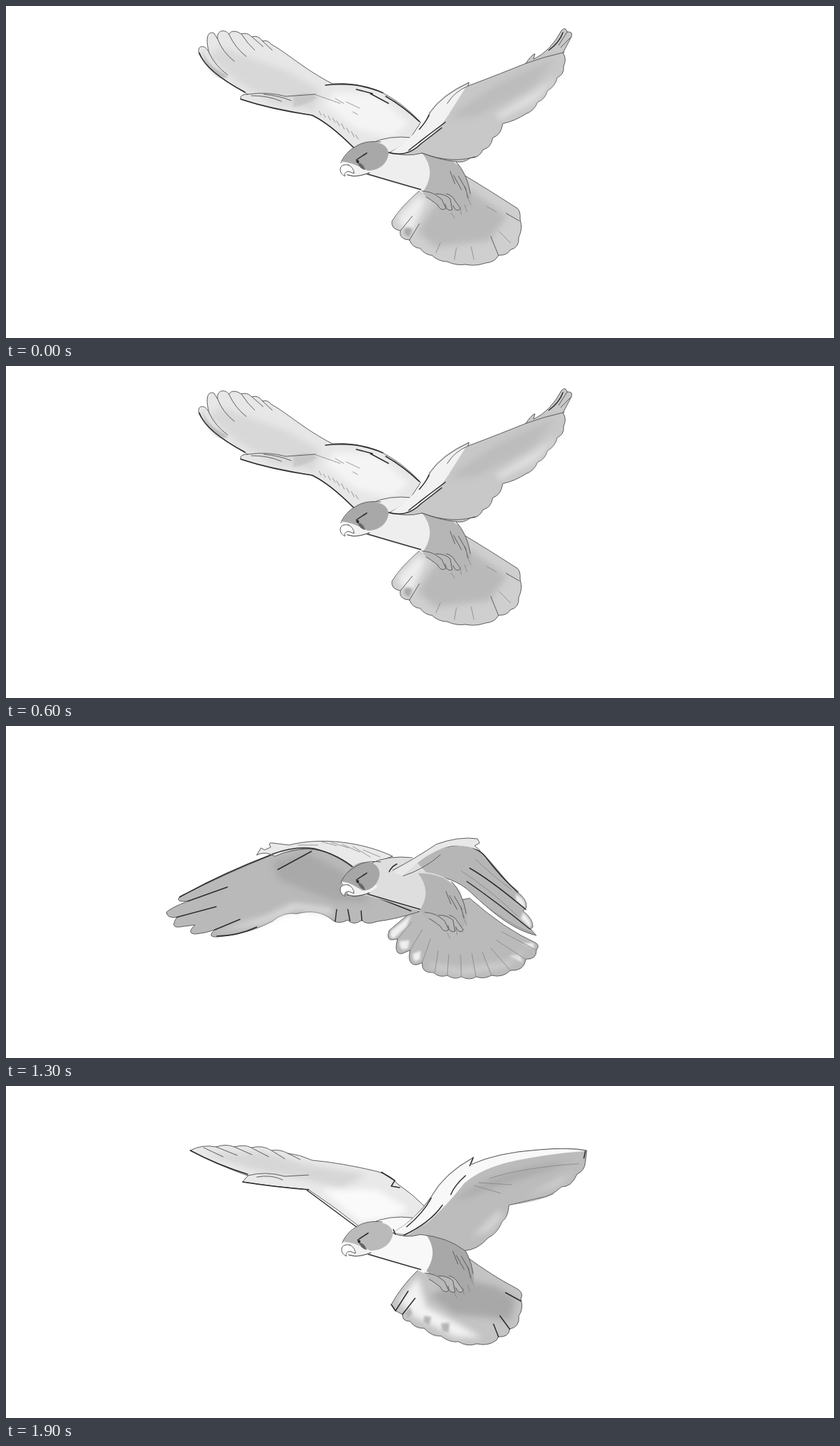
An HTML page that plays this animation: 1182 by 474 pixels, repeating every 2000 ms.

```html
<!DOCTYPE html>
<html lang="en">
<head>
<meta charset="utf-8">
<title>Flying falcon</title>
<style>
html, body { margin: 0; width: 100%; height: 100%; overflow: hidden; background: #fff }
svg { display: block; width: 1182px; height: 474px }
.pose { display: none }
.wash { stroke: none; filter: blur(5px) }
.soft { stroke: none; filter: blur(1.5px) }
.flat { stroke: none }
.bold { stroke: #2c2c2c; stroke-width: 1.5 }
.thin { stroke: #858585; stroke-width: .8 }
</style>
</head>
<body>
<svg viewBox="0 0 1182 474" fill="none" stroke="#5c5c5c" stroke-width="1" stroke-linecap="round" stroke-linejoin="round">
<defs>
  <g id="body">
    <path class="flat" d="M512 200Q545 182 582 190L600 209Q632 212 650 238L640 288Q606 272 590 264Q545 250 512 241Z"/>
    <path d="M521 196Q546 184 580 188"/>
    <path class="bold" d="M513 239Q550 250 592 262" stroke-width="1.3"/>
  </g>
  <g id="thigh">
    <path class="flat" d="M594 210Q634 210 650 234Q664 256 664 278Q656 296 640 293Q616 283 596 264Q615 236 594 210Z"/>
    <path d="M642 222Q658 238 663 268M634 236L641 254M639 242L650 262M646 243L657 262M655 258L660 274"/>
    <path class="thin" d="M657 270L664 284M648 288L650 298M655 284L658 294M636 296L640 303"/>
  </g>
  <g id="feet">
    <path fill="#b9b9b9" d="M594 264Q606 265 614 270L622 276L628 289Q621 294 616 284Q606 276 600 273M614 268Q626 268 634 275L637 291Q629 294 627 283M629 268Q638 271 641 278L649 289Q643 296 638 285"/>
  </g>
  <path id="cap" class="flat" d="M479 222C485 210 495 202 506 197C524 190 547 196 546 212C543 228 530 235 516 235Q506 230 499 227Q490 223 479 222Z"/>
  <path id="face" class="flat" fill="#f2f2f2" d="M479 222L520 212L530 230L514 241L490 243Z"/>
  <g id="features">
    <path d="M478 224C483 211 493 203 506 197Q518 192 535 194"/>
    <path fill="#fff" d="M489 227Q478 225 477 233Q477 240 484 243Q482 237 489 236L497 239Q496 230 489 227Z"/>
    <path d="M487 241L496 243Q506 243 519 238" stroke="#333"/>
    <path class="flat" fill="#666" d="M501 223Q510 224 513 234Q506 233 503 226Z"/>
    <path class="bold" d="M500 220Q507 215 515 210"/>
    <circle cx="502" cy="222" r="2" class="flat" fill="#222"/>
  </g>
</defs>

<g class="pose" id="up">
  <path fill="#cfcfcf" d="M590 264Q564 286 551 307Q549 318 563 321Q561 330 570 333L576 334Q580 345 591 346Q598 355 608 356Q618 365 630 365Q643 371 656 369Q670 372 684 367Q698 366 703 356Q716 356 720 348Q733 345 732 330Q738 318 734 305Q735 290 727 287Q693 265 655 242Z"/>
  <path class="wash" fill="#b9b9b9" d="M612 284L588 322L612 344L690 335L715 300L662 262Z"/>
  <path class="wash" fill="#ededed" d="M588 270L558 302L566 318L580 322L600 276Z"/>
  <path class="soft" fill="#aaa" d="M569 318Q575 314 580 319L576 329Q566 328 569 318Z"/>
  <path d="M703 356L692 329M733 307L714 296M563 321L580 300M576 334L590 311"/>
  <path class="thin" d="M614 352L620 338M640 362L643 345M668 362L664 344M720 338L704 322M700 294L686 286"/>
  <path fill="#e7e7e7" d="M345 126C318 110 288 92 276 69C271 56 284 53 290 67C284 45 288 35 297 39L302 47C300 35 312 32 318 40Q324 32 336 40Q344 37 351 44Q360 41 366 50Q374 48 379 55C400 66 425 90 466 111Q500 108 534 122Q566 138 592 166L570 200L498 203C478 186 462 168 437 156C400 149 360 142 335 133Q333 126 345 126Z"/>
  <path class="wash" fill="#d8d8d8" d="M285 70L310 60L400 92L448 120L440 150L380 138L330 108Z"/>
  <path class="wash" fill="#f4f4f4" d="M470 122L530 126L575 168L550 188L500 176L455 140Z"/>
  <path class="soft" fill="#bdbdbd" d="M280 63Q286 82 304 92L317 100Q312 106 301 100Q282 86 280 63Z"/>
  <path class="soft" fill="#c8c8c8" d="M411 128Q432 121 444 130Q434 140 410 144Z"/>
  <path d="M290 67Q299 86 316 98M302 47Q309 66 326 79M318 40Q328 61 343 72M336 40Q345 54 355 63M351 44L367 58M366 50L380 63M345 126Q374 122 399 129L442 126M350 128Q375 128 393 136M368 126Q390 128 407 135"/>
  <path class="bold" d="M276 67Q285 93 341 123M335 133Q380 148 437 156Q462 168 496 202M456 113Q502 108 538 124M542 129Q567 143 590 165M500 119L523 125M520 125L546 139"/>
  <path class="thin" d="M440 126L477 139M470 132L482 139M486 137L505 146M495 151L502 155M447 150L450 156M453 154L456 159M460 157L463 163M466 160L470 166M472 164L476 171M479 168L483 176M486 174L490 181M493 179L497 187M499 184L503 190"/>
  <use href="#body" fill="#eee"/>
  <use href="#thigh" fill="#b6b6b6"/>
  <use href="#feet"/>
  <path fill="#c8c8c8" d="M548 209Q565 201 590 178Q600 165 605 152Q622 127 661 109L660 114Q710 95 742 82Q749 71 755 68L753 76Q777 65 793 35Q799 29 801 37Q810 36 807 44L795 67Q801 75 796 86Q797 98 787 102Q784 115 773 121Q769 134 759 137Q754 150 742 154Q727 164 709 168Q707 184 695 188Q692 203 681 205Q676 217 663 217Q652 225 642 222Q620 220 594 210Q572 216 548 209Z"/>
  <path class="flat" fill="#f2f2f2" d="M549 209Q582 188 604 156Q620 130 659 112L640 142Q626 168 600 192L572 211Z"/>
  <path class="wash" fill="#bcbcbc" d="M632 160Q700 104 784 76L750 116L670 158Z"/>
  <path class="wash" fill="#dedede" d="M790 98L755 138L706 162L698 156L760 118Z"/>
  <path class="bold" d="M545 209Q572 217 592 197L622 174M575 206L602 185M590 194L627 166M604 156Q599 166 590 176M795 38Q790 52 775 63"/>
  <path d="M660 114Q640 122 630 139M742 82Q770 72 797 66M801 37L789 56M807 44L792 59M594 210Q637 226 670 215"/>
  <use href="#face"/>
  <use href="#cap" fill="#a8a8a8"/>
  <use href="#features"/>
</g>

<g class="pose" id="sweep">
  <path fill="#fff" d="M592 262L560 305Q558 317 576 317Q580 326 596 325L608 275Z"/>
  <path class="bold" d="M576 317L588 289M596 325L600 303M560 305V312"/>
  <path fill="#bcbcbc" d="M602 275Q602 300 597 318Q597 331 608 333Q615 345 626 347Q634 358 648 357Q663 364 676 361Q692 367 706 360Q721 363 732 352L736 350Q754 348 765 333L766 323Q736 310 692 281L660 250Z"/>
  <path class="wash" fill="#ddd" d="M606 302L622 333L690 352L710 340L660 322L630 292Z"/>
  <path class="wash" fill="#a3a3a3" d="M660 290L720 325L740 324L700 298L666 270Z"/>
  <path d="M734 351L704 316M727 346L700 318" stroke="#eee" stroke-width="2"/>
  <path class="bold" d="M737 349Q759 346 766 323"/>
  <path fill="#9a9a9a" d="M209 150Q222 153 229 160Q242 161 249 169Q268 178 325 206L318 210Q260 206 235 188Q213 170 209 150Z"/>
  <path d="M220 156Q245 186 304 205M228 160Q253 184 314 205M241 165Q268 186 320 206"/>
  <path fill="#a8a8a8" d="M300 208C350 208 400 195 450 195L500 200L548 248Q533 262 505 264Q480 269 460 265Q443 268 430 262C390 254 350 234 318 214Z"/>
  <path class="wash" fill="#d2d2d2" d="M330 210Q400 197 485 199L480 210L390 212Z"/>
  <path class="wash" fill="#929292" d="M360 224L480 221L510 246L430 252Z"/>
  <path class="bold" d="M209 150Q215 176 245 193T318 210Q350 207 405 199M432 262L430 250M450 264L447 259M314 213Q370 247 425 261"/>
  <path class="thin" d="M350 214Q410 210 470 210M380 229Q430 222 476 224"/>
  <path fill="#adadad" d="M600 205Q650 190 706 201Q735 200 748 185Q755 172 742 158Q756 154 756 175Q752 193 738 203Q770 188 776 170Q778 160 775 157Q790 156 789 176Q785 195 760 207Q790 202 799 182Q802 176 808 182Q809 197 795 211Q806 209 811 202Q813 216 805 223Q807 239 792 243Q788 260 772 262Q758 276 738 274Q715 284 692 273Q670 264 660 245Q640 215 600 205Z"/>
  <path class="wash" fill="#d4d4d4" d="M690 258Q740 246 795 218L786 242L740 268L706 270Z"/>
  <path class="wash" fill="#979797" d="M650 208L740 212L775 201L720 230L670 238Z"/>
  <path class="bold" d="M738 203Q764 193 773 181M760 207Q790 202 802 181M770 210Q801 212 811 201M742 158Q757 172 742 192"/>
  <use href="#body" fill="#e5e5e5"/>
  <use href="#thigh" fill="#a0a0a0"/>
  <path class="flat" fill="#a0a0a0" d="M570 209Q612 203 635 212L620 274Q595 263 566 252Q587 233 570 209Z"/>
  <path d="M616 206Q645 216 655 248"/>
  <use href="#feet"/>
  <path class="bold" fill="#f4f4f4" d="M549 209Q551 199 566 196Q610 184 650 181Q676 178 680 185L676 189L697 199Q650 187 610 199Q580 207 555 215Z"/>
  <path class="bold" d="M655 182L681 192M549 209Q549 215 560 212Q598 197 635 192"/>
  <use href="#face"/>
  <use href="#cap" fill="#bdbdbd"/>
  <use href="#features"/>
</g>

<g class="pose" id="low">
  <path fill="#bababa" d="M580 264L547 292Q542 307 553 305L559 304Q553 326 565 325L577 320Q572 341 586 341L594 338Q593 353 610 352Q619 360 630 356Q640 363 650 358Q662 364 671 358Q683 362 693 356Q709 360 720 349Q740 350 742 333Q758 333 757 320Q763 313 755 309Q712 290 662 246Z"/>
  <path class="soft" fill="#efefef" d="M578 270L550 292Q546 303 554 303L572 286ZM562 307L576 306L574 317Q561 324 562 307ZM581 325L592 321L591 333Q580 341 581 325ZM753 310L736 310L754 318ZM733 327L718 328L738 338Z"/>
  <path class="wash" fill="#cecece" d="M604 338L650 346L715 336L735 322L745 318L715 345L650 356L610 348Z"/>
  <path class="thin" d="M559 304L579 280M577 320L594 291M594 338L606 304M612 352L617 321M630 356L632 326M650 358L649 327M671 358L665 325M693 356L680 323M720 349L692 317M742 333L700 306M757 320L708 294"/>
  <g class="flap">
    <path fill="#b9b9b9" d="M380 184C340 200 290 222 247 245Q242 252 260 250Q234 260 229 266Q230 275 244 273Q234 288 247 287L270 284Q257 296 270 297Q284 296 298 291Q286 302 302 301C330 298 350 294 380 279Q396 265 415 268Q446 260 466 277Q474 284 488 277Q496 286 508 277Q514 285 530 279Q556 276 590 265L520 210L500 205Q460 172 420 176Z"/>
    <path class="wash" fill="#dedede" d="M298 294L370 272L410 253L462 260L470 270L414 262L365 283Z"/>
    <path class="wash" fill="#a9a9a9" d="M380 194L430 181L482 209L520 252L470 250L390 220Z"/>
    <path class="bold" d="M378 184Q310 210 248 244M260 250L316 230M244 273L300 258M298 291L334 276M470 279L472 262M491 278L488 262M508 278L507 264M301 300Q330 300 358 287M525 243L578 264M388 205L436 179"/>
    <path fill="#e9e9e9" d="M358 184L364 174L369 177L378 173Q373 166 380 167L404 170C450 158 510 166 552 186L520 197L500 206C480 190 455 176 432 175Q405 176 384 186Q370 178 358 184Z"/>
    <path class="bold" d="M380 183Q412 171 440 175Q474 183 500 205"/>
    <path class="thin" d="M450 165L472 171M464 166L489 174M480 169L505 180M495 172L520 187M510 177L534 187M417 170L445 170"/>
  </g>
  <g class="flap">
    <path fill="#b6b6b6" d="M566 213Q600 172 650 170Q672 172 684 186C700 202 714 222 728 236Q744 246 743 259L738 264Q753 276 752 287L749 290L757 299C720 290 690 262 664 238Q640 214 594 212Z"/>
    <path class="soft" fill="#efefef" d="M728 240Q743 248 741 260L728 250ZM738 266Q753 280 748 288L735 275Z"/>
    <path class="bold" d="M684 186Q707 217 731 237M662 203Q692 220 742 262M658 222Q700 251 748 290M650 170Q673 173 684 186"/>
    <path class="thin" d="M670 190Q695 214 722 234M650 207Q688 231 730 271M664 238Q700 275 757 299"/>
  </g>
  <use href="#body" fill="#dedede"/>
  <use href="#thigh" fill="#b4b4b4" x="-6"/>
  <use href="#feet" x="4" y="2"/>
  <g class="flap">
    <path class="flat" fill="#e8e8e8" d="M552 209Q590 182 620 166Q650 158 673 161L676 167L669 171L677 178Q650 168 632 172Q600 180 567 214Z"/>
    <path d="M552 206Q588 187 614 169Q646 157 673 161L676 167L669 171L677 178M567 214Q596 205 620 184"/>
  </g>
  <path class="bold" d="M547 208Q550 201 558 197"/>
  <use href="#face"/>
  <use href="#cap" fill="#a6a6a6" transform="translate(91 0) scale(.81 1)"/>
  <use href="#features"/>
</g>

<g class="pose" id="rise">
  <path fill="#c2c2c2" d="M590 260Q562 284 543 300Q543 312 553 313Q552 326 563 327Q567 340 580 340Q586 355 598 355L608 349Q611 364 624 363L632 361Q640 371 652 366Q665 373 675 365Q691 370 700 360L710 362Q714 356 711 350Q723 357 732 346Q741 345 737 335Q747 335 752 319Q716 307 690 287L652 238Z"/>
  <path class="wash" fill="#ededed" d="M588 266L548 300L564 323L582 314L604 276Z"/>
  <path class="wash" fill="#dcdcdc" d="M582 333L620 352L690 356L715 346L670 346L610 332Z"/>
  <path class="thin" d="M553 313L580 286M563 327L590 294M580 340L592 313M608 349L616 326M632 361L634 335M653 366L651 341M675 365L668 338M703 358L689 330M711 350L696 328M737 335L710 316"/>
  <path class="bold" d="M650 246Q684 292 751 319"/>
  <path fill="#c9c9c9" d="M340 140L300 152Q281 152 276 147Q266 150 287 158Q250 172 222 178Q214 189 234 190Q209 199 211 208Q214 215 229 212Q210 220 216 228L232 227Q221 235 238 237Q305 241 360 225Q412 205 488 202L500 205L440 165L410 150Z"/>
  <path class="wash" fill="#e5e5e5" d="M250 231L330 215L400 190L450 195L400 206L330 229Z"/>
  <path class="wash" fill="#bababa" d="M250 191L346 152L420 164L460 190L380 180L300 204Z"/>
  <path class="bold" d="M222 180Q250 174 288 159M218 189Q246 188 277 176M211 208Q236 207 264 195M216 228Q250 226 280 212M228 235Q300 241 360 225M414 207Q444 201 480 202"/>
  <path fill="#f0f0f0" d="M327 126L352 134Q420 130 465 140Q510 154 560 187L520 200L497 204Q450 172 410 149Q370 150 346 140Z"/>
  <path class="wash" fill="#dedede" d="M475 165L520 175L548 188L515 197Z"/>
  <path class="bold" d="M333 127L352 138L379 146M327 126L346 141Q375 150 410 149M340 128L371 138M410 149L496 203"/>
  <path class="thin" d="M440 140L475 150M462 142L495 158M485 151L517 167M480 165L497 175M510 183L520 189M523 172L546 185"/>
  <use href="#body" fill="#e1e1e1"/>
  <use href="#thigh" fill="#bbb" x="4"/>
  <use href="#feet"/>
  <path fill="#f1f1f1" d="M548 210Q572 185 592 152Q612 120 640 115L650 111L661 110L656 118L682 121L676 125Q720 138 740 160Q762 180 764 191L756 198Q757 208 746 207Q746 220 738 220Q722 200 712 190Q712 210 692 220Q660 230 622 216L575 216Z"/>
  <path class="flat" fill="#bcbcbc" d="M562 215Q603 196 622 140Q650 130 668 152Q700 168 712 190Q711 211 692 219Q660 229 622 215Q590 208 562 215Z"/>
  <path class="wash" fill="#dcdcdc" d="M566 205L590 174L614 136L606 180Z"/>
  <path class="bold" d="M635 133Q661 133 688 163Q681 169 667 153M700 183Q714 203 738 220M756 198Q739 177 727 166M746 207Q730 184 715 171M622 216Q658 230 691 219"/>
  <path d="M656 118L629 116M676 125L650 118M580 190L590 177M592 192L602 177M557 215Q590 203 610 217"/>
  <use href="#face"/>
  <use href="#cap" fill="#acacac"/>
  <use href="#features"/>
</g>

<g class="pose" id="high">
  <path fill="#c4c4c4" d="M588 263Q564 286 550 312L556 321L566 326Q565 336 577 336Q583 346 597 346Q608 358 621 357Q634 367 646 365Q659 373 672 368Q688 372 700 363L703 358Q718 359 719 347Q734 344 732 328Q739 319 735 304Q740 294 727 288Q696 272 656 243Z"/>
  <path class="wash" fill="#a8a8a8" d="M650 275L700 286L728 305L720 335L688 330L640 326L605 300Z"/>
  <path class="wash" fill="#f2f2f2" d="M588 272L560 306L580 328L640 358L680 360L650 342L600 315Z"/>
  <path class="soft" fill="#b6b6b6" d="M570 323L577 316L580 325L573 332ZM597 328L607 330L604 342L596 337ZM621 339L633 338L632 352L623 350Z"/>
  <path class="bold" d="M550 312L556 321M703 358L696 340M719 347L705 328M735 307L713 295M566 326L584 303M556 321L574 293"/>
  <path fill="#e9e9e9" d="M345 128Q300 112 263 92Q280 83 300 87Q313 82 326 87Q340 83 350 88Q366 84 379 92Q391 90 402 96Q420 98 437 106Q480 110 530 122Q551 128 558 139Q580 154 600 174L570 204L506 202Q471 174 432 148Q384 144 338 137Z"/>
  <path class="wash" fill="#d6d6d6" d="M282 96L370 94L430 112L515 126L480 146L430 135L350 119Z"/>
  <path class="wash" fill="#fafafa" d="M450 148L530 148L575 176L550 189L505 194Z"/>
  <path class="bold" d="M263 92Q300 112 345 126M338 137Q382 144 432 148M430 149L500 201M536 123L555 135L550 143L562 145"/>
  <path d="M345 128Q370 121 398 129L432 127M358 130Q378 126 395 134M282 88L310 101M300 87L330 99M326 87L351 98M350 88L375 101M379 92L398 104M402 96L420 105"/>
  <use href="#body" fill="#f8f8f8"/>
  <use href="#thigh" fill="#a8a8a8" x="4"/>
  <use href="#feet" x="4" y="3"/>
  <path fill="#bcbcbc" d="M552 210Q586 190 607 158Q625 125 667 102L664 112Q701 95 760 91Q805 87 829 92L827 109Q826 121 815 126Q808 144 793 144Q778 158 761 160L718 170Q717 187 708 194Q702 210 688 217Q673 234 655 235Q631 216 592 212Q570 218 552 210Z"/>
  <path class="wash" fill="#a9a9a9" d="M640 164Q690 122 805 106L780 118L700 143Z"/>
  <path class="wash" fill="#d5d5d5" d="M664 216L704 177L710 187L690 208ZM740 158L810 123L790 141Z"/>
  <path class="flat" fill="#f8f8f8" d="M553 209Q585 190 607 160Q625 127 666 104L664 113Q701 96 760 92Q800 88 827 93Q780 96 730 106Q680 116 654 139Q630 170 603 194L574 212Z"/>
  <path class="bold" d="M568 213Q606 195 623 170M656 128Q640 142 635 155M607 160Q596 181 572 201M553 205L556 212M667 102L662 114M827 93L825 103"/>
  <path class="thin" d="M690 132Q740 116 818 111M668 142L706 153M675 138L722 141M718 170Q760 164 782 154"/>
  <g transform="translate(2 0)">
    <use href="#face"/>
    <use href="#cap" fill="#bababa" transform="translate(-34 0) scale(1.07 1)"/>
    <use href="#features"/>
  </g>
</g>
</svg>
<script>
const order = 'up sweep mid low rise high up low rise high'.split(' ');
const poses = document.querySelectorAll('.pose');
const flaps = document.querySelectorAll('.flap');
let shown;

function draw() {
  const name = order[Math.floor(performance.now() / 100) % order.length];
  if (name !== shown) {
    shown = name;
    const half = name === 'mid';
    // Halfway down the wings are the low ones, flattened towards the shoulder.
    flaps.forEach(f => f.setAttribute('transform', half ? 'translate(0 60) scale(1 .7)' : ''));
    poses.forEach(p => p.style.display = p.id === (half ? 'low' : name) ? 'inline' : 'none');
  }
  requestAnimationFrame(draw);
}
draw();
</script>
</body>
</html>
```
